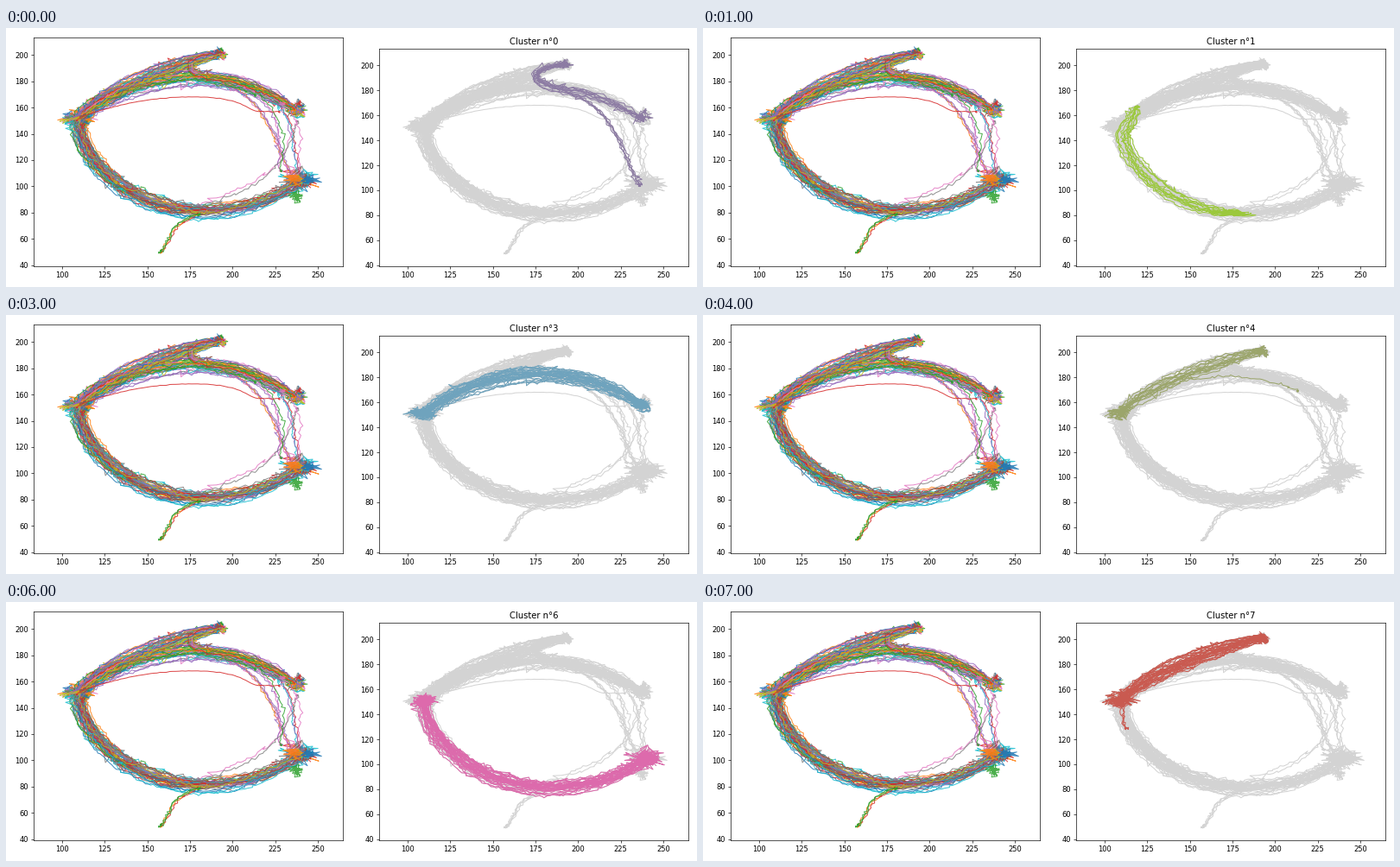
A matplotlib script that plays this animation: 800 px wide and 300 px high, repeating every 8000 ms.

```python
import numpy as np
import matplotlib.pyplot as plt
from matplotlib.animation import FuncAnimation

DPI = 60
W, H = 800, 300
rng = np.random.default_rng(7)

HUB, PORT, WHARF, PIER = (109, 151), (192, 201), (237, 158), (241, 105)
HUB_ROOM, PORT_ROOM, WHARF_ROOM, PIER_ROOM = (4, 2.6), (2, 1.8), (2.6, 2.8), (5, 4)
SPOT = (0.7, 0.7)
COLORS = ["#8c7ba3", "#9bc83c", "#dfc98c", "#6fa3bd",
          "#9ba56b", "#6cae9c", "#dd6aac", "#c95a50"]


def bezier(*points):
    """Cubic curve through the first and last of four points."""
    a, b, c, d = np.array(points, float)
    t = np.linspace(0, 1, 101)[:, None]
    return ((1 - t)**3 * a + 3 * t * (1 - t)**2 * b
            + 3 * t**2 * (1 - t) * c + t**3 * d)


def join(*parts):
    return np.vstack([np.atleast_2d(p) for p in parts])


def smooth(values, width):
    padded = np.pad(values, width // 2, mode="edge")
    return np.convolve(padded, np.ones(width) / width, mode="valid")


def loiter(center, room, count):
    """Aimless zigzag around a stop."""
    base = np.array(center) + rng.normal(0, 0.7, 2) * room
    return base + rng.normal(0, 0.6, (count, 2)) * room


def track(route, start=SPOT, end=SPOT, lane=3.2, jitter=0.55):
    """Noisy trajectory that follows a route within its lane."""
    steps = np.hypot(*np.diff(route, axis=0).T)
    dist = np.concatenate([[0], np.cumsum(steps)])
    n = max(15, int(dist[-1] / 1.8))
    at = np.linspace(0, dist[-1], n)
    x, y = (smooth(np.interp(at, dist, col), 5) for col in route.T)
    dx, dy = np.gradient(x), np.gradient(y)
    norm = np.hypot(dx, dy) + 1e-9
    width = lane * (0.35 + 0.65 * np.sin(np.pi * at / dist[-1])**0.6)
    drift = smooth(rng.normal(0, 1.6, n), 15)
    off = np.clip(rng.normal(0, 0.95) + drift, -2, 2) * width
    path = np.column_stack([x - dy / norm * off, y + dx / norm * off])
    path += rng.normal(0, jitter, (n, 2))
    spikes = rng.random((n, 1)) < 0.03
    path += spikes * rng.normal(0, 4 * jitter, (n, 2))
    return np.vstack([loiter(route[0], start, 6), path,
                      loiter(route[-1], end, 7)])


NORTH = bezier(HUB, (125, 172), (160, 190), PORT)
EAST = bezier(HUB, (150, 190), (195, 194), WHARF)
SOUTH = bezier(HUB, (114, 95), (183, 52), PIER)
TURN = bezier(PORT, (168, 196), (173, 187), (186, 183))
TURN_EAST = join(TURN, EAST[60:])
LINK = bezier((190, 181), (222, 165), (225, 135), (236, 105))
OUTER = bezier((226, 164), (240, 145), (236, 125), (238, 108))
INNER = join(EAST[40:75], bezier((208, 175), (232, 155), (228, 130), (228, 112)))
BACK = bezier((180, 85), (235, 108), (228, 125), (238, 150))
BEACH = join((119, 167), (116, 157), SOUTH[4:62])
SPUR = join((112.5, 129), (112.5, 142), NORTH[4:])
WEST = join(NORTH[40:5:-1], SOUTH[5:40])
HOOK = bezier(HUB, (135, 182), (180, 190), (213, 169))
SHORTCUT = join(bezier(HUB, (140, 170), (200, 175), (212, 157)), (228, 157))
TAIL = bezier((180, 79), (160, 70), (165, 60), (158, 50))

# cluster, count, route, room at start, room at end, lane
FLEET = [
    (0, 9, TURN_EAST, PORT_ROOM, WHARF_ROOM, 1.8),
    (0, 4, join(TURN, LINK), PORT_ROOM, SPOT, 2),
    (1, 11, BEACH, SPOT, (7, 1.5), 2.8),
    (2, 3, EAST, SPOT, WHARF_ROOM, 1),
    (2, 3, TURN_EAST, PORT_ROOM, WHARF_ROOM, 1),
    (3, 32, EAST, HUB_ROOM, WHARF_ROOM, 3.2),
    (4, 14, NORTH, HUB_ROOM, PORT_ROOM, 3),
    (4, 1, HOOK, HUB_ROOM, SPOT, 0.5),
    (5, 8, WEST, SPOT, (3, 2), 3),
    (6, 34, SOUTH, HUB_ROOM, PIER_ROOM, 3.4),
    (7, 28, NORTH, HUB_ROOM, PORT_ROOM, 3),
    (7, 3, SPUR, SPOT, PORT_ROOM, 2),
    (None, 4, OUTER, WHARF_ROOM, PIER_ROOM, 2),
    (None, 3, INNER, SPOT, SPOT, 1.5),
    (None, 2, BACK, SPOT, SPOT, 1.5),
]


def build_tracks():
    """List of (cluster, color, path) in drawing order."""
    fleet = [(k, track(route, start, end, lane))
             for k, count, route, start, end, lane in FLEET
             for _ in range(count)]
    order = rng.permutation(len(fleet))
    tracks = [(fleet[j][0], f"C{i % 10}", fleet[j][1])
              for i, j in enumerate(order)]
    tracks.append((None, "C3", track(SHORTCUT, lane=0, jitter=0.12)))
    for color in ("C3", "C1", "C2", "C2"):
        tracks.append((None, color, track(TAIL, lane=0.5)))
    for i, color in enumerate(("C0", "C1", "C2")):
        center = (243 - 3 * i, 108 - 6 * i)
        tracks.append((None, color, loiter(center, (5 - i, 4), 35)))
    return tracks


def add_axes(fig, left, top):
    bottom, width = 275.7, 358.3
    ax = fig.add_axes([left / W, 1 - bottom / H, width / W,
                       (bottom - top) / H])
    ax.set(xlim=(83.3, 264.8), ylim=(39.3, 213.6),
           xticks=range(100, 251, 25), yticks=range(40, 201, 20))
    return ax


plt.rcParams["font.family"] = "DejaVu Sans"
fig = plt.figure(figsize=(W / DPI, H / DPI), dpi=DPI)
ax_all = add_axes(fig, 32, 10.6)
ax_one = add_axes(fig, 432, 23.7)
title = ax_one.set_title("", fontsize=12)

groups = [[] for _ in COLORS]
for cluster, color, path in build_tracks():
    ax_all.plot(*path.T, color=color, lw=1.2, alpha=0.85)
    ax_one.plot(*path.T, color="lightgray", lw=1.2)
    if cluster is not None:
        line, = ax_one.plot(*path.T, color=COLORS[cluster], lw=1.2,
                            zorder=2.2, visible=False)
        groups[cluster].append(line)


def update(k):
    title.set_text(f"Cluster n°{k}")
    for i, group in enumerate(groups):
        for line in group:
            line.set_visible(i == k)
    return [title]


anim = FuncAnimation(fig, update, frames=len(COLORS), interval=1000,
                     repeat=True, repeat_delay=0, blit=False)
plt.show()
```
